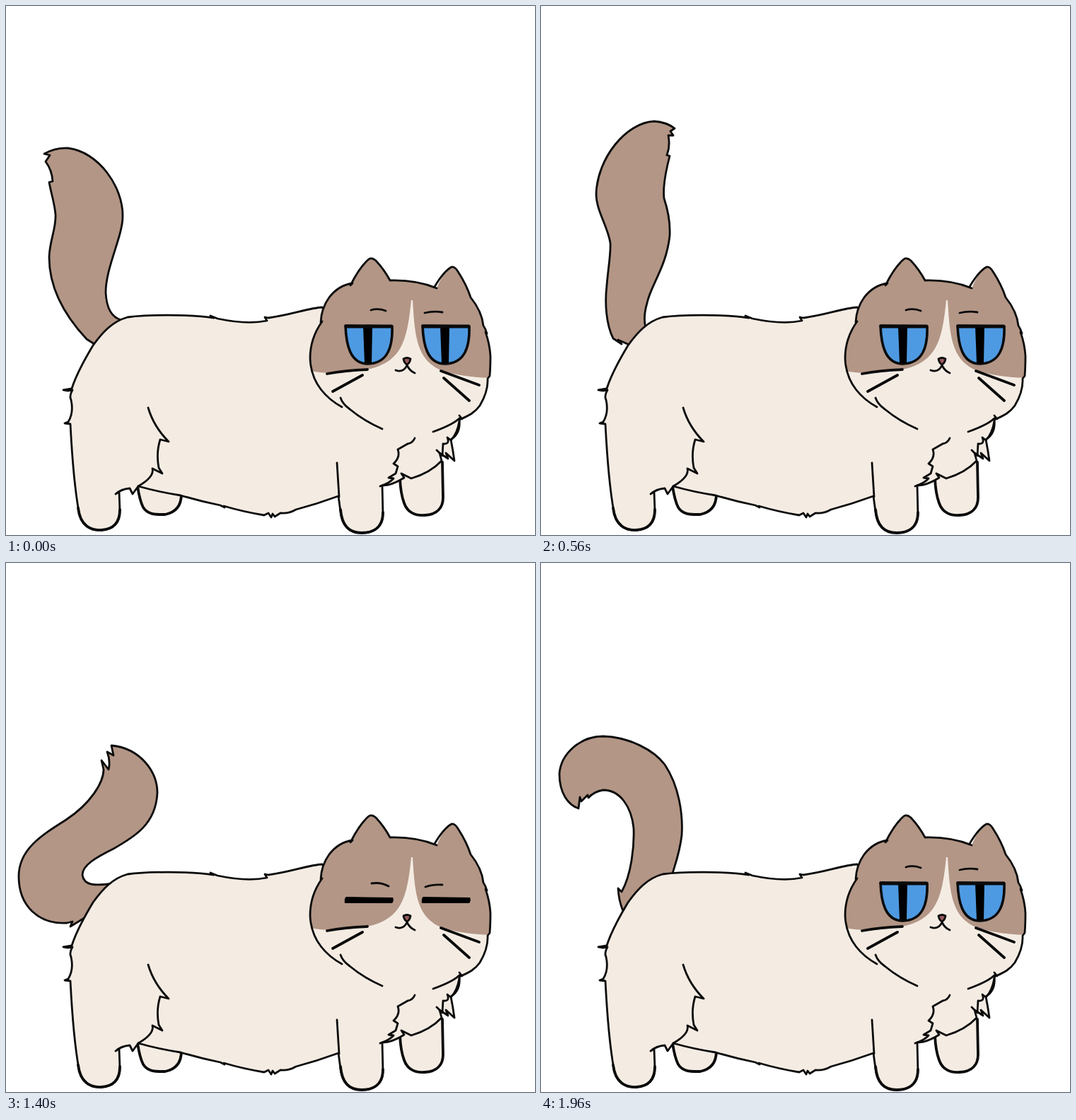
An HTML page that plays this animation: 748x748 px, repeating every 2.1 s.

```html
<!DOCTYPE html>
<html lang="en">
<head>
<meta charset="utf-8">
<title>Cat</title>
<style>
  html, body { margin: 0; width: 100%; height: 100%; overflow: hidden; background: #fff; }
  svg { display: block; width: 100vw; height: 100vh; }
  .line { fill: none; stroke: #0b0b0b; stroke-width: 2.8; stroke-linecap: round; stroke-linejoin: round; }
  .fur { fill: #f4ece3; }
  .brown { fill: #b39686; }
  .eye { fill: #4e9ae2; stroke-width: 3.6; }
  .bold { stroke-width: 3.8; }
</style>
</head>
<body>
<svg viewBox="0 0 748 748">
  <defs>
    <path id="skull" d="M488 394Q500 369 513 358Q517 355 523 360Q535 373 543 388Q580 387 609 399Q619 375 630 369Q635 368 640 377Q651 394 657 412Q673 432 675 452Q678 456 680 463L678 461Q684 478 685 495Q685 510 684 523L681 527Q682 545 670 565C663 575 655 579 641 585L604 602L532 598L475 567C455 556 431 535 430 498C430 477 437 460 447 446L445 447Q446 427 457 412Q470 395 488 394Z"/>
    <clipPath id="inSkull"><use href="#skull"/></clipPath>
  </defs>

  <path id="tail" class="line brown"/>

  <!-- far legs -->
  <path class="line fur bold" d="M186 679Q189 699 194 709C201 720 213 719 225 719C240 716 248 706 248 690"/>
  <path class="line fur bold" d="M557 668Q558 690 563 703C568 717 580 721 592 720C610 719 618 709 618 695L617 645"/>

  <!-- body and near legs -->
  <path class="line fur" d="M447 426C428 427 402 437 371 441L366 440L369 445C345 450 318 446 299 442L289 438L294 441C260 436 200 436 172 440C150 446 136 462 123 480C108 505 98 525 93 541L81 543Q88 545 94 543Q89 551 92 557Q96 575 88 588L83 590L91 591C93 630 97 682 103 715C106 735 120 742 135 741C150 740 161 732 161 715L160 687L155 690Q163 683 175 682L179 690L187 679Q215 687 247 692C270 699 288 703 303 706L309 709L308 707Q335 715 365 720L371 717L375 723L377 718L380 722L388 717Q400 718 410 712Q440 704 470 693L473 715C475 735 485 745 503 745C522 745 533 735 533 720L532 678L541 677Q552 674 563 667L559 661L573 668Q600 660 616 643L613 632L625 640L622 632L634 643Q632 628 629 613Q643 605 641 585Z"/>
  <path class="line bold" d="M102 710C105 735 120 742 135 741C150 740 161 732 161 712M473 712C475 735 485 745 503 745C522 745 533 735 533 716"/>
  <path class="line" d="M201 568C206 585 217 603 230 616L218 613Q212 632 216 653L221 661L207 654Q210 666 187 679M468 646L471 694M578 611Q575 618 568 619L554 627Q558 638 548 647L554 651L551 661L541 667L548 668Q542 675 529 679M641 587Q638 605 629 614L624 610Q628 620 618 619L617 636L609 628"/>

  <!-- head -->
  <use href="#skull" class="fur"/>
  <path class="brown" clip-path="url(#inSkull)" d="M425 515Q460 523 505 515C560 506 567 474 573 416L575 416C578 465 580 500 615 515Q644 525 690 526V340H425Z"/>
  <path class="line" d="M475 567C455 556 431 535 430 498C430 477 437 460 447 446L445 447Q446 427 457 412Q470 395 490 392L487 395Q500 369 513 358Q517 355 523 360Q535 373 543 388Q580 387 609 399M606 397Q619 375 630 369Q635 368 640 377Q651 394 657 412Q673 432 675 452Q678 456 680 463L678 461Q684 478 685 495Q685 510 684 523L681 527Q682 545 670 565C663 575 655 579 641 585M473 554Q476 563 486 570Q505 586 532 598M641 583Q632 592 604 602M641 579L645 584"/>
  <path class="line bold" d="M454 520Q480 515 511 514M462 545L504 522M615 516L669 536M619 526L655 558"/>
  <path class="line" d="M551 515Q562 519 567 508Q571 516 578 519"/>
  <path class="line" style="fill:#985b5e" d="M562 499Q567 496 572 499Q571 505 567 507Q563 505 562 499Z"/>

  <path id="brows" class="line"/>
  <g id="eyes"></g>
</svg>
<script>
const STEP = 140, SLOTS = 15;

const tails = [
  'M125 478L114 471C85 440 61 400 61 355C62 330 71 315 70 295C69 280 63 262 61 249L66 248Q65 232 56 220L62 211L54 209Q70 200 88 201C130 206 166 255 165 298C165 325 141 370 141 405C142 425 148 440 163 444',
  'M118 490L96 478C50 462 16 425 17 380C18 350 48 330 62 305C72 285 72 268 70 256L76 260L72 240L80 246L80 227C130 230 172 265 172 305C170 350 125 370 115 400C108 430 130 448 160 446',
  'M114 500L91 514L94 507L86 509C46 511 18 485 18 443C18 405 50 385 85 363C120 340 138 310 138 292L135 279L145 292Q148 280 143 267L152 272L149 258C190 262 214 295 214 325C212 369 182 387 152 404C128 416 108 427 108 441C110 456 125 457 152 453',
  'M110 500L88 505C50 500 31 465 32 430C36 385 75 360 95 330C110 300 130 232 190 227Q225 226 256 252L246 254L250 264L236 262C205 268 205 300 198 325C180 370 125 385 118 425Q118 450 150 453',
  'M127 480L109 472L114 478L102 470C92 450 90 420 93 395C95 370 99 350 98 335C94 310 78 290 78 265C80 215 120 165 160 163Q177 164 189 173L183 177L187 183L180 183Q183 198 178 211L182 212C176 235 172 255 174 272C180 290 183 305 182 325C177 370 155 395 150 420Q144 440 148 455',
  'M117 490L108 466C118 440 120 410 118 380C116 350 92 325 82 295L76 300L78 280L68 278C64 235 95 214 125 214C165 220 192 270 191 320C190 360 172 400 168 441',
  'M117 490L109 466C122 440 128 405 124 380C115 345 90 338 60 338L52 346L48 338L36 346L32 335L11 330C14 280 55 247 95 247C150 252 186 310 187 350C186 385 180 410 175 440',
  'M116 492Q110 478 109 460L114 465C128 440 132 400 131 375C128 345 112 321 88 321Q75 323 67 332L66 328L57 337L55 331L53 347C38 342 26 325 26 298C28 270 55 245 88 245C125 246 160 265 175 285C195 315 201 355 199 385C196 410 190 425 186 439'
];

// Each lid draws an eye whose left edge is at x.
const lids = {
  open: {
    brows: 'M516 430Q526 427 537 431M592 434Q604 431 617 433',
    eye: x => `<path class="line eye" d="M${x} 452L${x + 66} 453C${x + 67} 482 ${x + 60} 505 ${x + 32} 506C${x + 6} 506 ${x + 1} 478 ${x} 452Z"/>
      <path d="M${x + 25} 453H${x + 38}L${x + 37} 505H${x + 27}Z"/>
      <path class="line" style="stroke-width:5" d="M${x + 1} 453H${x + 65}"/>`
  },
  half: {
    brows: 'M516 442Q527 440 538 445M592 446Q604 443 617 444',
    eye: x => `<path class="line eye" d="M${x + 1} 464H${x + 65}Q${x + 67} 478 ${x + 64} 493H${x + 4}Q${x} 478 ${x + 1} 464Z"/>
      <path d="M${x + 25} 463H${x + 38}V494H${x + 25}Z"/>
      <path class="line" style="stroke-width:5" d="M${x + 2} 464H${x + 64}"/>`
  },
  shut: {
    brows: 'M517 453Q530 451 541 457M593 458Q604 454 617 455',
    eye: x => `<path d="M${x + 1} 472L${x + 67} 473Q${x + 69} 477 ${x + 66} 481H${x - 1}Q${x - 2} 474 ${x + 1} 472Z"/>`
  }
};

const byId = id => document.getElementById(id);
const tail = byId('tail'), brows = byId('brows'), eyes = byId('eyes');
let shown = -1;

function draw(slot) {
  // The second wag skips one pose to close the loop.
  tail.setAttribute('d', tails[slot < 13 ? slot % 8 : slot - 7]);
  const lid = slot === 8 || slot === 11 ? lids.half
    : slot === 9 || slot === 10 ? lids.shut : lids.open;
  brows.setAttribute('d', lid.brows);
  eyes.innerHTML = lid.eye(480) + lid.eye(589);
}

const start = performance.now();
function tick() {
  const slot = Math.floor((performance.now() - start) / STEP) % SLOTS;
  if (slot !== shown) draw(shown = slot);
  requestAnimationFrame(tick);
}
tick();
</script>
</body>
</html>
```
